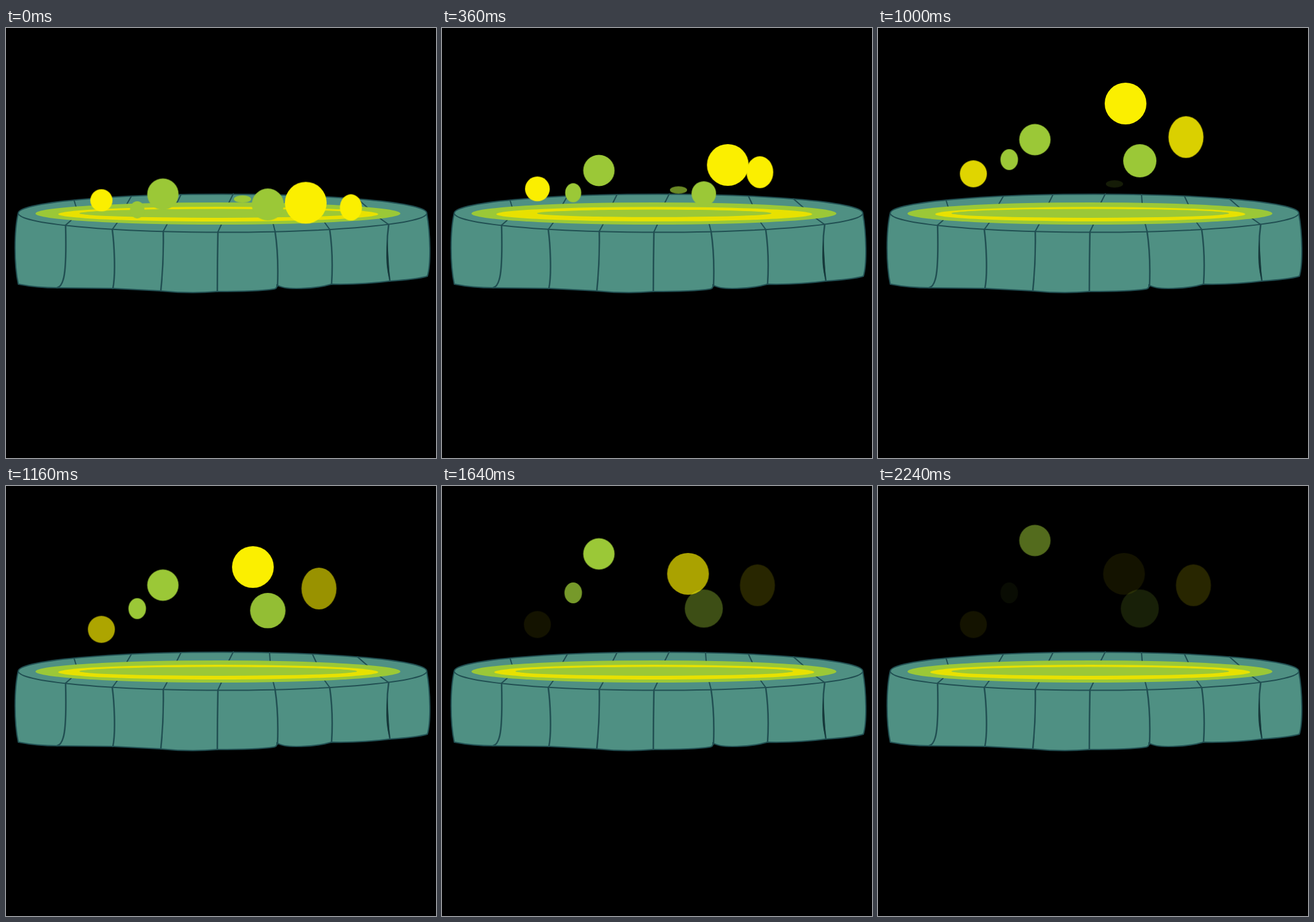
Write an HTML page that moves like this. It is 700x700 px and loops after 2280 ms.

```html
<!DOCTYPE html>
<html lang="en">
<head>
<meta charset="utf-8">
<title>Bubbling pool</title>
<style>
  html, body { margin: 0; width: 100%; height: 100%; overflow: hidden; background: #000; }
  svg { display: block; width: 100vw; height: 100vh; }
  .stone { fill: #4f9083; }
  .line { fill: none; stroke: #214f52; stroke-width: 2; stroke-linecap: round; stroke-linejoin: round; }
  .heavy { stroke-width: 2.5; }
  .crack { fill: #16383a; }
  .green { fill: #9bc837; }
  .yellow { fill: #fbef00; }
  .ring { fill: #e8e100; }
</style>
</head>
<body>
<svg viewBox="0 0 700 700">
  <defs>
    <path id="side" d="M20 301 C13 330 13 385 20 417 Q50 423 85 423 L175 424 Q215 426 252 428 Q300 433 344 429
      Q410 429 436 425 Q442 424 441 418 Q450 425 480 424 Q510 423 530 417 Q580 418 625 412 Q670 409 686 404
      C692 385 691 335 685 302 Z"/>
    <ellipse id="rim" cx="352.5" cy="301.5" rx="332.5" ry="31"/>
  </defs>
  <use href="#side" class="stone"/>
  <use href="#side" class="line"/>
  <use href="#rim" class="stone"/>
  <use href="#rim" class="line"/>
  <path class="line heavy" d="M97 321 C98 360 98 395 93 410 Q90 421 83 423 M173 328 C176 350 179 400 174 424
    M256 331 Q257 380 252 428 M345 332 Q344 380 344 429 M438 331 Q444 370 442 420
    M527 328 Q533 370 530 417 M623 320 Q617 360 625 412"/>
  <path class="crack" d="M621 345 Q616 385 625 412 Q623 380 621 345 Z"/>
  <path class="line" d="M97 321 L106 313 M173 328 L181 317 M256 331 L262 320 M345 332 L351 319
    M438 331 L435 319 M527 328 L519 317 M623 320 L609 310
    M111 281 L114 291 M204 274 L197 286 M285 271 L278 285 M370 270 L363 284
    M429 271 L430 285 M499 274 L505 287 M572 278 L588 292"/>
  <ellipse class="green" cx="345" cy="302" rx="297" ry="18"/>
  <g transform="translate(345.5 303)"><ellipse id="ringOut" class="ring" rx="260.5" ry="12"/></g>
  <g transform="translate(345.5 301.7)"><ellipse id="ringIn" class="green" rx="226" ry="7.2"/></g>
  <g id="bubbles"></g>
</svg>
<script>
  const LOOP = 2280, STEP = 40;
  const group = document.getElementById('bubbles');

  // Moves evenly between key points [ms, value], one step at a time, then holds.
  function track(el, prop, points) {
    const stops = [...points, [LOOP, points.at(-1)[1]]];
    const frames = stops.map(([ms, value], i) => ({
      offset: ms / LOOP,
      [prop]: value,
      easing: i < points.length ? `steps(${(stops[i + 1][0] - ms) / STEP})` : 'linear'
    }));
    el.animate(frames, { duration: LOOP, iterations: Infinity });
  }

  // path: [ms, x, y] points; grow: [ms, scale] points; fade: begin, end, remaining opacity.
  function bubble({ color, rx, ry = rx, path, grow, fade: [begin, end, rest] }) {
    const el = document.createElementNS('http://www.w3.org/2000/svg', 'ellipse');
    el.setAttribute('class', color);
    el.setAttribute('rx', rx);
    el.setAttribute('ry', ry);
    group.append(el);
    track(el, 'translate', path.map(([ms, x, y]) => [ms, `${x}px ${y}px`]));
    if (grow) track(el, 'scale', grow);
    const solid = begin ? [[0, 1]] : [];
    track(el, 'opacity', [...solid, [begin, 1], [end, rest]]);
  }

  track(document.getElementById('ringOut'), 'scale', [[0, 1], [360, 0.987], [680, 0.845], [1080, 1]]);
  track(document.getElementById('ringIn'), 'scale', [[0, 1], [360, 0.845], [680, 0.874], [1000, 1]]);

  bubble({
    color: 'yellow', rx: 22,
    path: [[0, 155.3, 280.5], [680, 155.3, 245.3], [1480, 155.3, 225.5]],
    grow: [[0, 0.82], [680, 1]],
    fade: [920, 1640, 0.08]
  });
  bubble({
    color: 'green', rx: 14.3, ry: 17,
    path: [[0, 213.6, 296], [680, 213.6, 243.5], [1440, 213.6, 174]],
    grow: [[0, 0.82], [680, 1]],
    fade: [1440, 2240, 0.06]
  });
  bubble({
    color: 'green', rx: 25.5,
    path: [[0, 255.4, 270.5], [360, 255.4, 232], [1000, 255.4, 181.7], [1360, 255.4, 136], [1880, 255.4, 88.7]],
    fade: [1840, 2240, 0.54]
  });
  bubble({
    color: 'green', rx: 14, ry: 6,
    path: [[0, 385, 278.5], [600, 385, 253.8]],
    fade: [0, 1160, 0]
  });
  bubble({
    color: 'green', rx: 31,
    path: [[0, 426.2, 287.3], [360, 426.2, 269.5], [1200, 426.2, 199.5]],
    grow: [[0, 0.84], [360, 0.645], [1360, 1]],
    fade: [1120, 1840, 0.16]
  });
  bubble({
    color: 'yellow', rx: 34,
    path: [[0, 488, 284.5], [360, 465.3, 223], [680, 422.5, 204.3], [1000, 403, 123], [1360, 400.5, 143]],
    fade: [1320, 2240, 0.08]
  });
  bubble({
    color: 'yellow', rx: 28.5, ry: 34,
    path: [[0, 561.5, 292], [360, 517.5, 234.7], [680, 485.2, 198.8], [1240, 513.5, 161.6]],
    grow: [[0, 0.63], [1000, 1]],
    fade: [920, 1440, 0.16]
  });
</script>
</body>
</html>
```
